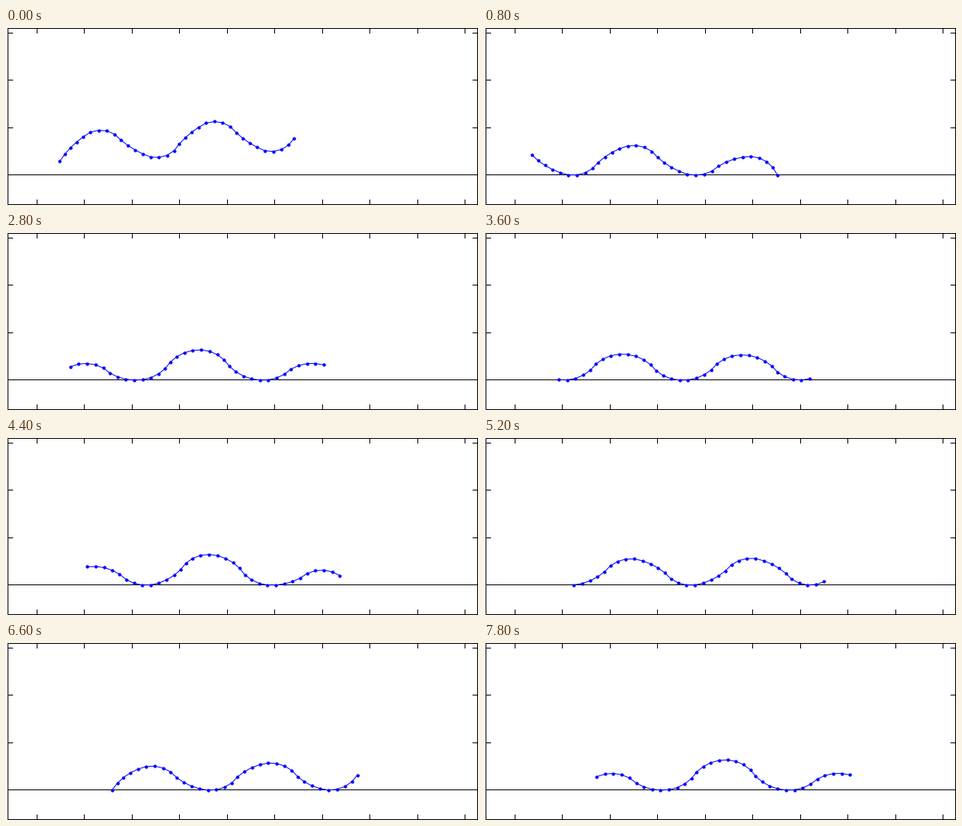
These frames come from a looping animation (600x226 px, 8000 ms). A matplotlib script:

```python
import numpy as np
import matplotlib.pyplot as plt
from matplotlib.animation import FuncAnimation

W, H, DPI = 600, 226, 100
FRAMES, STEP = 40, 200
LINKS, GROUP, LINK = 33, 4, 10.8
GROUND = 187.5
WEIGHT, CONTACT = 1.2e-4, 0.005

# forward travel: time step -> mean x of the body
TRAVEL = [(0, 215.1), (4, 217.2), (10, 231.8), (18, 254.2),
          (26, 272.8), (33, 289.9), (39, 304.3)]

DIFF = np.diff(np.eye(LINKS), axis=0)
BEND = np.zeros((LINKS + 1, LINKS + 1))
BEND[1:, 1:] = DIFF.T @ DIFF
DAMP = np.diag([1e-4] + [0.03] * LINKS)
CHAIN = np.tril(np.ones((LINKS + 1, LINKS)), -1)


def settle(bend, weight):
    """Link angles and heights of an elastic chain resting on the floor."""
    theta = np.concatenate([[0], np.cumsum(bend)])
    theta -= theta.mean()
    base = -(LINK * CHAIN @ np.sin(theta)).min()
    for _ in range(250):
        h = base + LINK * CHAIN @ np.sin(theta)
        jac = np.column_stack([np.ones(LINKS + 1),
                               LINK * CHAIN * np.cos(theta)])
        grad = jac.T @ (weight + CONTACT * np.minimum(h, 0))
        grad[1:] += DIFF.T @ (DIFF @ theta - bend)
        low = jac[h < 0]
        move = np.linalg.solve(BEND + CONTACT * low.T @ low + DAMP, -grad)
        move /= max(1, np.abs(move[1:]).max() / 0.1)
        base += move[0]
        theta = theta + move[1:]
    return theta, base + LINK * CHAIN @ np.sin(theta)


def pose(n):
    """Node positions in pixels at time step n."""
    air = max(0.0, 1 - n / 2)
    slack = 1 - 0.35 * np.exp(-((n - 6) / 0.8) ** 2)
    amp = np.radians(17.8 + 1.8 * air) * slack
    phase = np.radians(43.2 * n - 106)
    group = np.arange(LINKS - 1) // GROUP
    bend = amp * np.cos(phase - group * np.pi / 2)

    theta, h = settle(bend, WEIGHT * (1 - 0.95 * air))
    if air:
        theta = theta + np.radians(3) * air
        h = LINK * CHAIN @ np.sin(theta)
        h += 17.5 * air - h.min()
    x = LINK * CHAIN @ np.cos(theta)
    x += np.interp(n, *zip(*TRAVEL)) - x.mean()
    return x, GROUND - h


# the small margin keeps the pixel height from rounding down
fig = plt.figure(figsize=(W / DPI, (H + 0.01) / DPI), dpi=DPI,
                 facecolor="white")
ax = fig.add_axes([0, 0, 1, 1])
ax.set_xlim(0, W)
ax.set_ylim(H, 0)
ax.axis("off")

PX = 72 / DPI
L, R, T, B = 1.5, 598.5, 0.5, 225.5


def rule(x0, y0, x1, y1):
    ax.plot([x0, x1], [y0, y1], color="black", lw=PX)


for y in (T, B, GROUND):
    rule(L, y, R, y)
for x in (L, R):
    rule(x, T, x, B)
for i in range(10):
    x = 38.5 + 60.5 * i
    rule(x, T, x, T + 6)
    rule(x, B, x, B - 6)
for i in range(4):
    y = GROUND - 60.5 * i
    rule(L, y, L + 6, y)
    rule(R, y, R - 6, y)

body, = ax.plot([], [], "-o", color="#0000ff", lw=PX, ms=4.3 * PX, mew=0,
                zorder=5)
poses = [pose(n) for n in range(FRAMES)]


def draw(n):
    body.set_data(*poses[n])
    return body,


anim = FuncAnimation(fig, draw, frames=FRAMES, interval=STEP, repeat=True,
                     repeat_delay=0)
plt.show()
```
